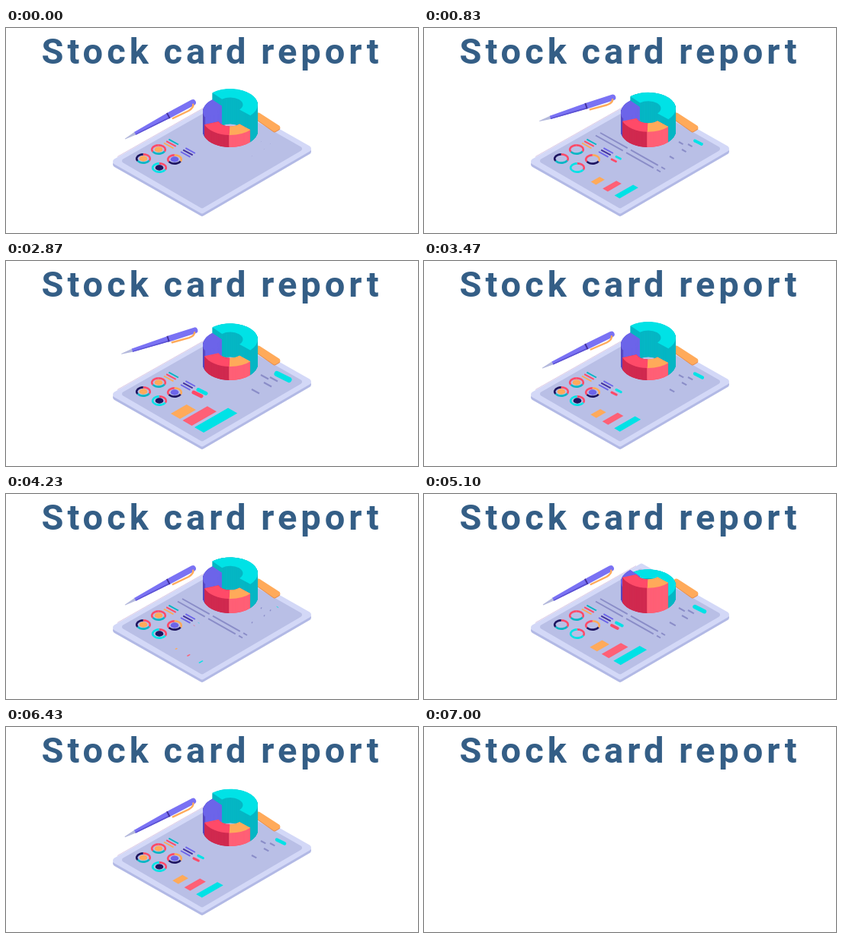
These frames come from a looping animation (540x270 px, 7.03 s). An HTML page with a canvas:

```html
<!DOCTYPE html>
<html lang="en">
<meta charset="utf-8">
<title>Stock card report</title>
<style>
  html, body { margin: 0; width: 540px; height: 270px; overflow: hidden; background: #fff; }
  canvas, svg { position: absolute; left: 0; top: 0; }
  text { font: 700 47px Roboto, Inter, sans-serif; letter-spacing: 5px; word-spacing: -2px; fill: #345e86; }
</style>
<canvas width="540" height="270"></canvas>
<svg width="540" height="270"><text x="46.5" y="47">Stock card report</text></svg>
<script>
const ctx = document.querySelector('canvas').getContext('2d');
const LOOP = 7030, HIDE = 7000, HALF = 3500;
const CYAN = '#00e2e6', TEAL = '#05b6c4', RED = '#ff4a68', PINK = '#ff6076', CRIMSON = '#d0294f',
  ORANGE = '#ffaa5a', PURPLE = '#6c64e9', VIOLET = '#7a72f4', INDIGO = '#43319f', NAVY = '#1d1560',
  LINE = '#8a8dc8';

const clamp = u => Math.max(0, Math.min(1, u));
const smooth = u => (1 - Math.cos(Math.PI * u)) / 2;

// Rises from 0 to 1 after `from`, falls back to 0 by `to`.
const ramp = (t, from, to, span) => clamp(Math.min(t - from, to - t) / span);
const pulse = (...args) => smooth(ramp(...args));

function polygon(color, ...points) {
  ctx.fillStyle = color;
  ctx.beginPath();
  points.forEach(p => ctx.lineTo(...p));
  ctx.fill();
}

function stroke(color, width, x, y, dx, dy, cap = 'butt') {
  ctx.strokeStyle = color;
  ctx.lineWidth = width;
  ctx.lineCap = cap;
  ctx.beginPath();
  ctx.moveTo(x, y);
  ctx.lineTo(x + dx, y + dy);
  ctx.stroke();
}

function slab(color, radius, corners, dy = 0) {
  const [left, top] = corners;
  ctx.fillStyle = color;
  ctx.beginPath();
  ctx.moveTo((left[0] + top[0]) / 2, (left[1] + top[1]) / 2 + dy);
  for (let i = 1; i <= 4; i++) {
    const p = corners[i % 4], q = corners[(i + 1) % 4];
    ctx.arcTo(p[0], p[1] + dy, q[0], q[1] + dy, radius);
  }
  ctx.fill();
}

function tablet() {
  const outer = [[136, 176], [285, 91], [404, 159], [257, 245]];
  const tab = [[322, 116], [331, 111], [362, 131], [352, 137]];
  slab('#b2b9e5', 4, outer, 3.5);
  slab('#d3d8f7', 4, outer);
  slab('#b9bfe6', 3, [[149, 175], [284, 98], [391, 159], [257, 238]]);
  stroke('#d5bddd', 0.8, 146, 169.5, 132, -75);
  slab('#e58a4c', 3, tab, 1);
  slab(ORANGE, 3, tab);
}

// Ring of equal arcs with a round core that shrinks and grows.
function donut(x, y, dot, core, colors) {
  const step = 2 * Math.PI / colors.length;
  colors.forEach((color, i) => {
    ctx.strokeStyle = color;
    ctx.lineWidth = 2.6;
    ctx.beginPath();
    ctx.ellipse(x, y, 8.8, 5.6, 0, i * step - 1.6, (i + 1) * step - 1.6);
    ctx.stroke();
  });
  ctx.fillStyle = core;
  ctx.beginPath();
  ctx.ellipse(x, y, 5.4 * dot, 3.7 * dot, 0, 0, 7);
  ctx.fill();
}

function legend(x, y, colors) {
  colors.forEach((c, i) => stroke(c, 1.9, x + 3.2 * i, y - 2.4 * i, 12.5, 6.8));
}

// Isometric bar with its left corner at (x, y), scaled about its foot.
function bar(color, x, y, length, size) {
  const w = 7 * size, l = length * size;
  const at = (u, v) => [x + 6 + .866 * (u + v), y + 3.5 + .5 * (v - u)];
  polygon(color, at(0, -w), at(l, -w), at(l, w), at(0, w));
}

function pill(color, width, x, y, length, size) {
  if (size > 0) stroke(color, width * size, x, y, length * size, length * size / 2, 'round');
}

function screen(t) {
  const grow = ramp(t, 0, 4400, 1500) + ramp(t, 4400, HIDE, 900);
  const dot = 1 - pulse(t, 0, 2450, 750) - pulse(t, 4300, 6500, 750);
  const shown = pulse(t % HALF, 0, 2800, 600);

  donut(180, 172, dot, ORANGE, [RED, TEAL, NAVY]);
  donut(200, 160, dot, ORANGE, [RED, TEAL, RED]);
  donut(221, 173, dot, PURPLE, [ORANGE, NAVY, RED]);
  donut(201, 184, dot, NAVY, [RED, CYAN, CYAN]);
  legend(207, 151.5, [ORANGE, RED, TEAL]);
  legend(229, 163, [PURPLE, INDIGO, PURPLE]);

  if (shown > 0) {
    ctx.setLineDash([41, 5]);
    for (const i of [0, 1]) stroke(LINE, 2, 231 - 6 * i, 138 + 3.5 * i, 85 * shown, 48 * shown);
    ctx.setLineDash([]);
  }

  [ORANGE, PINK, CYAN].forEach((c, i) => bar(c, 216 + 15.5 * i, 201 + 9 * i, 24 + 13.5 * i, grow));
  pill(CYAN, 5, 252, 169.5, 10, grow);
  pill(RED, 5, 246, 173, 10, grow);
  pill(CYAN, 7, 355, 148.5, 16, grow);
  if (grow > 0) {
    for (const [x, y] of [[334, 150], [346, 153], [338, 160], [322, 169]])
      stroke(LINE, 2, x, y, 10 * grow, 5.5 * grow);
  }
}

function arc(y, rx, ry, from, to, back) {
  const rad = Math.PI / 180;
  ctx.ellipse(294, y, rx, ry, 0, from * rad, to * rad, back);
}

function sector(color, y, from, to) {
  ctx.fillStyle = color;
  ctx.beginPath();
  arc(y, 36, 21, from, to);
  arc(y, 16.5, 9.6, to, from, true);
  ctx.fill();
}

// Extruded ring piece: stacked layers give the cut faces and the outer wall.
function piece(top, face, wall, from, to, rise) {
  const y = 111 - rise;
  ctx.strokeStyle = wall;
  ctx.lineWidth = 1;
  ctx.lineCap = 'butt';
  for (let h = 136; h > y; h -= .5) {
    sector(face, h, from, to);
    ctx.beginPath();
    arc(h, 35.5, 20.5, from, to);
    ctx.stroke();
  }
  sector(top, y, from, to);
}

function ring(t) {
  const phase = t % HALF, u = Math.min(phase, HALF - phase) / (HALF / 2);
  const rise = 10 * Math.cos(Math.PI * u ** 1.5);
  piece(CYAN, TEAL, TEAL, -131, 43, rise);
  piece(PURPLE, PURPLE, INDIGO, 160, 229, rise * .3 - 2);
  piece(RED, CRIMSON, CRIMSON, 92, 160, -rise * .9);
  piece(ORANGE, PINK, PINK, 43, 92, -rise * .9);
}

function pen(t) {
  const lift = [0, 2220, 5070].reduce((sum, s) => sum + pulse(t, s, s + 1470, 735), 0);
  ctx.save();
  ctx.translate(156 - 5 * lift, 146 - 24.5 * lift);
  ctx.rotate(-.494 + .19 * lift);
  polygon('#b4b9dc', [0, -.4], [16, -2.2], [16, 2.2], [0, .6]);
  polygon(VIOLET, [15, -2.2], [64, -3.8], [64, 3.8], [15, 2.2]);
  polygon('#5a50d0', [15, 1], [64, 2], [64, 3.8], [15, 2.2]);
  stroke(VIOLET, 8, 67, 0, 34, 0, 'round');
  stroke(INDIGO, 8, 63.5, 0, 2, 0);
  ctx.strokeStyle = ORANGE;
  ctx.lineWidth = 2.4;
  ctx.lineCap = 'round';
  ctx.beginPath();
  ctx.moveTo(68, 6);
  ctx.lineTo(91, 7);
  ctx.quadraticCurveTo(99, 6.5, 100, 2.5);
  ctx.stroke();
  ctx.restore();
}

function draw(t) {
  ctx.clearRect(0, 0, 540, 270);
  if (t >= HIDE) return;
  tablet();
  screen(t);
  ring(t);
  pen(t);
}

const start = performance.now();
function frame() {
  draw((performance.now() - start) % LOOP);
  requestAnimationFrame(frame);
}
frame();
</script>
</html>
```
